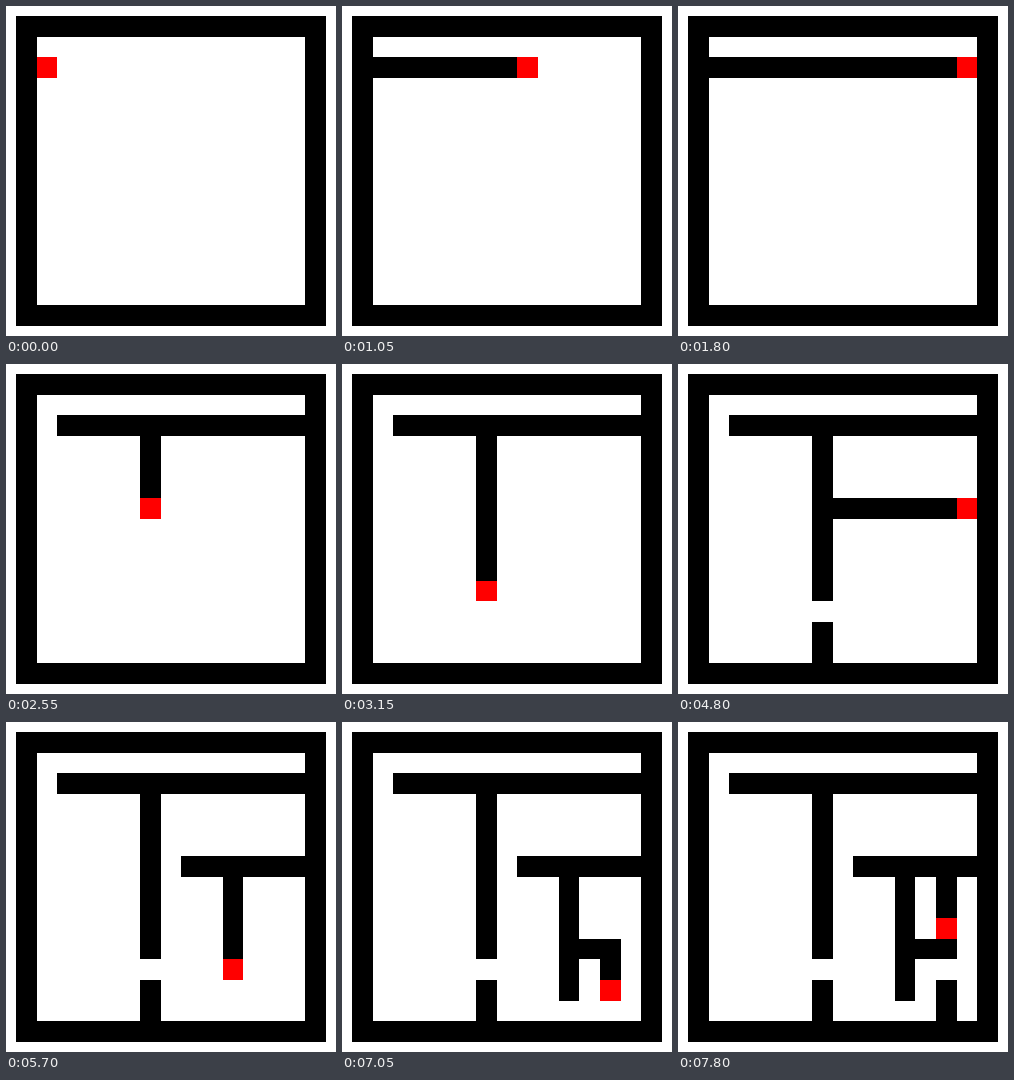
An HTML page with a canvas that plays this animation: 330x330 px, repeating every 8 s.

```html
<!DOCTYPE html>
<html>
<head>
<meta charset="utf-8">
<style>
html, body { margin: 0; overflow: hidden; background: #fff; }
canvas { display: block; }
</style>
</head>
<body>
<canvas id="maze" width="330" height="330"></canvas>
<script>
const ctx = document.getElementById('maze').getContext('2d');
const STEP = 150, LOOP = 8000;
const edge = i => Math.round(10 + i * 310 / 15);

function fill(x, y, color, w = 1, h = 1) {
  ctx.fillStyle = color;
  ctx.fillRect(edge(x), edge(y), edge(x + w) - edge(x), edge(y + h) - edge(y));
}

// Each wall grows from (x, y) along (dx, dy), then opens a gap at one cell.
const walls = [
  { x: 1, y: 2, dx: 1, dy: 0, n: 13, gap: 0 },
  { x: 6, y: 3, dx: 0, dy: 1, n: 11, gap: 8 },
  { x: 7, y: 6, dx: 1, dy: 0, n: 7, gap: 0 },
  { x: 10, y: 7, dx: 0, dy: 1, n: 7, gap: 6 },
  { x: 11, y: 10, dx: 1, dy: 0, n: 3, gap: 2 },
  { x: 12, y: 11, dx: 0, dy: 1, n: 3, gap: 0 },
  { x: 12, y: 7, dx: 0, dy: 1, n: 3, gap: 0 }
];

const moves = walls.flatMap(({ x, y, dx, dy, n, gap }) => {
  const cell = (i, color) => ({ x: x + dx * i, y: y + dy * i, color });
  return [...Array.from({ length: n }, (_, i) => cell(i, '#000')), cell(gap, '#fff')];
});

function draw(now) {
  const step = Math.floor(now % LOOP / STEP);
  const last = Math.min(step, 52);
  ctx.fillStyle = '#fff';
  ctx.fillRect(0, 0, 330, 330);
  fill(0, 0, '#000', 15, 15);
  fill(1, 1, '#fff', 13, 13);
  for (let i = 0; i < last; i++) fill(moves[i].x, moves[i].y, moves[i].color);
  fill(moves[last].x, moves[last].y, '#f00');
}

let start;
function tick(now) {
  start ??= now;
  draw(now - start);
  requestAnimationFrame(tick);
}
draw(0);
requestAnimationFrame(tick);
</script>
</body>
</html>
```
